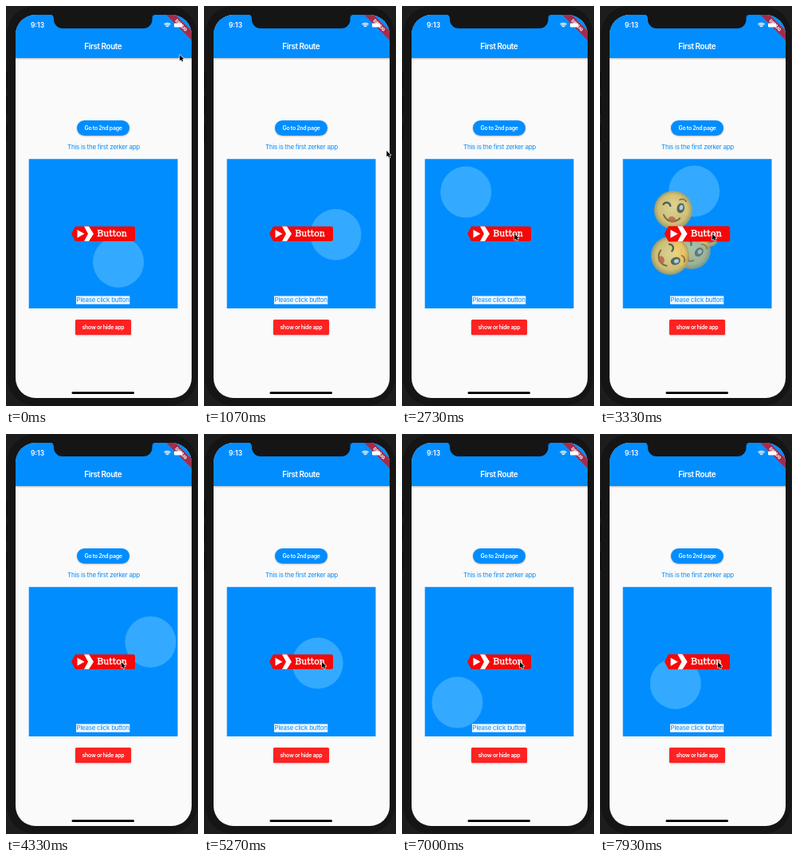
An HTML page with a canvas for the animation above (8000 ms loop, 241 px wide and 500 px high).

```html
<!DOCTYPE html>
<html lang="en">
<head>
<meta charset="utf-8">
<style>
  html, body { margin: 0; width: 100%; height: 100%; overflow: hidden; background: #151515; }
  canvas { display: block; width: 241px; height: 500px; }
</style>
</head>
<body>
<canvas></canvas>
<script>
const canvas = document.querySelector('canvas');
const ctx = canvas.getContext('2d');
const dpr = window.devicePixelRatio || 1;
canvas.width = 241 * dpr;
canvas.height = 500 * dpr;

const LOOP = 8;
const BLUE = '#028dff';
const BEZEL = '#151515';
const SANS = 'Inter, "Open Sans", sans-serif';

// The ball runs straight between wall hits: [seconds, position].
const ballX = [[0, 141], [.75, 183], [2.68, 77], [4.34, 182], [7.2, 61], [8, 98]];
const ballY = [[0, 320], [3.03, 223], [7.05, 337], [8, 310]];

// The first faces of a burst are small; spread holds offsets reached at the given age.
const bursts = [
  { start: 3, age: .33, small: 1, spread: [[15, 3], [-30, -30], [-7, 20], [-34, 27]] },
  { start: 5.4, age: .73, small: 2, spread: [[-84, -58], [-58, 60], [16, -22], [74, 47], [63, 26]] }
];
const clicks = [3, 5.4, 7.8];

const lerp = (a, b, k) => a + (b - a) * k;

function ramp(t, start, end) {
  return Math.min(1, Math.max(0, (t - start) / (end - start)));
}

function ease(t, start, end) {
  const k = ramp(t, start, end);
  return k * k * (3 - 2 * k);
}

function along(corners, t) {
  const i = corners.findIndex(c => c[0] > t);
  const [t0, a] = corners[i - 1], [t1, b] = corners[i];
  return lerp(a, b, ramp(t, t0, t1));
}

function path(points, closed = true) {
  ctx.beginPath();
  points.forEach(p => ctx.lineTo(...p));
  if (closed) ctx.closePath();
}

function fill(color) {
  ctx.fillStyle = color;
  ctx.fill();
}

function stroke(color, width) {
  ctx.strokeStyle = color;
  ctx.lineWidth = width;
  ctx.stroke();
}

function box(x, y, w, h, r, color) {
  ctx.beginPath();
  ctx.roundRect(x, y, w, h, r);
  fill(color);
}

function oval(x, y, rx, ry, color) {
  ctx.beginPath();
  ctx.ellipse(x, y, rx, ry, 0, 0, 7);
  fill(color);
}

function arc(x, y, r, from, to, color, width) {
  ctx.beginPath();
  ctx.arc(x, y, r, from, to);
  stroke(color, width);
}

function label(text, x, y, size, color, weight = 400, tracking = -.034) {
  ctx.font = `${weight} ${size}px ${SANS}`;
  ctx.letterSpacing = `${tracking * size}px`;
  ctx.textAlign = 'center';
  ctx.fillStyle = color;
  ctx.fillText(text, x, y);
  ctx.letterSpacing = '0px';
}

function raisedBox(...args) {
  ctx.save();
  ctx.shadowColor = 'rgba(0,0,0,.3)';
  ctx.shadowBlur = 2 * dpr;
  ctx.shadowOffsetY = .7 * dpr;
  box(...args);
  ctx.restore();
}

function drawPhone() {
  box(0, 0, 241, 500, 0, '#1d1d1d');
  box(1, 0, 239, 500, 36, BEZEL);
  for (const y of [82, 113, 148]) box(0, y, 1.5, 22, 1, '#0e0e0e');
}

function drawStatus() {
  label('9:13', 39.5, 27, 8.5, '#fff', 600, 0);

  ctx.save();
  ctx.translate(220, 24);
  ctx.rotate(Math.PI / 4);
  box(-32, -4, 64, 8, 0, '#a62b48');
  label('DEBUG', 0, 2, 5.4, '#fff', 800, 0);
  ctx.restore();

  for (let r = 2.2; r < 7; r += 2) arc(202.5, 27.5, r, -2.3, -.84, '#fff', 1.3);
  box(211, 21.5, 10, 5, 1.3, '#fff');
  box(221.6, 23, 1, 2, .5, '#fff');
}

function drawNotch() {
  box(60, 0, 123.5, 28, 11, BEZEL);
  for (const [x, side] of [[60, -1], [183.5, 1]]) {
    ctx.beginPath();
    ctx.moveTo(x + side * 5, 10);
    ctx.quadraticCurveTo(x, 11, x, 16);
    ctx.lineTo(x, 10);
    fill(BEZEL);
  }
}

function drawPage() {
  box(11, 10, 223, 481, 0, '#fafafa');
  raisedBox(11, 10, 223, 55, 0, BLUE);
  label('First Route', 121.8, 53.6, 10, '#fff', 600, -.045);
  raisedBox(89, 143, 66, 19, 9.5, BLUE);
  label('Go to 2nd page', 122, 155, 7, '#fff', 600, -.045);
  label('This is the first zerker app', 122.5, 178.5, 8, BLUE);
  raisedBox(87, 392, 70, 19, 1.5, '#ff2222');
  label('show or hide app', 122, 404, 7, '#fff', 600, -.045);
  box(82.5, 482.3, 78.5, 2.8, 1.4, '#000');
}

function drawFace(x, y, r, angle, alpha) {
  ctx.save();
  ctx.translate(x, y);
  ctx.rotate(angle);
  ctx.scale(r, r);
  ctx.globalAlpha = alpha;
  const skin = ctx.createRadialGradient(-.1, -.1, .1, 0, 0, 1);
  skin.addColorStop(0, '#ffdc7c');
  skin.addColorStop(.75, '#f0c65c');
  skin.addColorStop(1, '#b09a58');
  oval(0, 0, 1, 1, skin);
  ctx.lineCap = 'round';
  oval(.36, -.18, .2, .26, '#3e5560');
  oval(.38, -.22, .1, .13, '#bfe2ee');
  arc(-.38, -.1, .2, 3.5, 5.9, '#3e4a44', .1);
  arc(.38, -.42, .24, 3.9, 5.5, '#6e6338', .07);
  arc(0, .1, .5, .5, 2.6, '#6e5a38', .08);
  oval(.05, .5, .2, .16, '#b5684a');
  ctx.restore();
}

function drawBursts(t) {
  for (const { start, age, small, spread } of bursts) {
    const u = t - start;
    if (u < 0 || u > 1.25) continue;
    const fade = 1 - ramp(u, .9, 1.25);
    spread.forEach(([dx, dy], i) => {
      const k = u / age;
      const solid = i < small || i === 2 ? .65 : .85;
      drawFace(122 + dx * k, 285 + dy * k, i < small ? 13 : 24, i * .5 - .6 + u, solid * fade);
    });
  }
}

function drawImageButton(t) {
  const pulse = clicks.reduce((sum, c) => sum + Math.sin(Math.PI * ramp(t, c, c + .5)), 0);
  const top = -9.3, bottom = 9.3;
  ctx.save();
  ctx.translate(122, 284.8);
  ctx.scale(1 + .035 * pulse, 1 + .035 * pulse);
  box(-25, top, 65, 18.6, 2.5, '#f50808');
  path([[-40, 0], [-35, top], [-18, top], [-12, 0], [-18, bottom], [-35, bottom]]);
  fill('#f50808');
  path([[-24, top], [-18, top], [-12, 0], [-18, bottom], [-24, bottom], [-19, 0]]);
  fill('#fff');
  path([[-32.5, -5], [-23.5, 0], [-32.5, 5]]);
  fill('#fff');
  ctx.font = '11px "DejaVu Serif", serif';
  ctx.textAlign = 'center';
  ctx.fillStyle = ctx.strokeStyle = '#fff';
  ctx.lineWidth = .4;
  ctx.fillText('Button', 11, 3.2);
  ctx.strokeText('Button', 11, 3.2);
  ctx.restore();
}

function drawStage(t) {
  ctx.save();
  ctx.beginPath();
  ctx.rect(28.7, 191.3, 186.8, 186.8);
  ctx.clip();
  box(28, 191, 188, 188, 0, BLUE);
  oval(along(ballX, t), along(ballY, t), 32, 32, '#33aaff');
  drawBursts(t);
  drawImageButton(t);
  box(88, 362.4, 67.3, 10.3, 0, '#f4f9ff');
  label('Please click button', 121.7, 370.4, 8, BLUE);
  ctx.restore();
}

// Down the right edge, across to the button, then a slight drift.
function drawCursor(t) {
  const drop = ease(t, .3, 1.9), approach = ease(t, 2.05, 2.75), drift = ease(t, 3.4, 5.2);
  ctx.save();
  ctx.translate(
    218 - 10 * drop + 16 * Math.sin(Math.PI * drop) - 67 * approach + 7 * drift,
    61 + 254 * drop - 30 * approach
  );
  path([[0, 0], [0, 7.5], [1.8, 5.9], [3, 8.6], [4.3, 8], [3.1, 5.4], [5.4, 5.3]]);
  ctx.lineJoin = 'round';
  stroke('#fff', 1.2);
  fill('#000');
  ctx.restore();
}

function frame() {
  const t = performance.now() / 1000 % LOOP;
  ctx.setTransform(dpr, 0, 0, dpr, 0, 0);
  drawPhone();
  ctx.save();
  ctx.beginPath();
  ctx.roundRect(12, 11, 221, 479, 25);
  ctx.clip();
  drawPage();
  drawStage(t);
  drawStatus();
  drawNotch();
  ctx.restore();
  drawCursor(t);
  requestAnimationFrame(frame);
}
frame();
</script>
</body>
</html>
```
